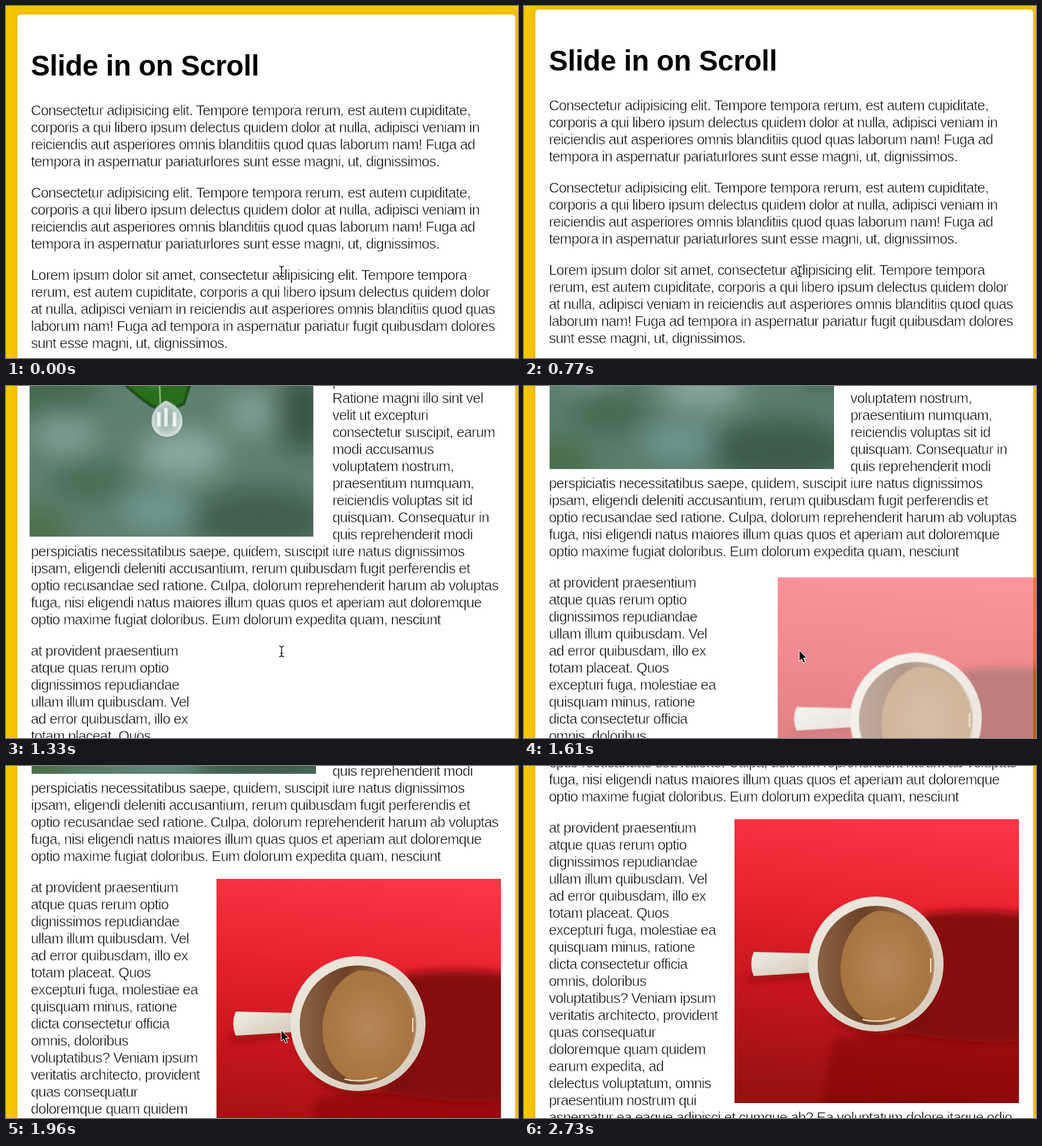
An HTML page that plays this animation: 720x496 px, repeating every 2.8 s.

```html
<!DOCTYPE html>
<html lang="en">
<head>
<meta charset="utf-8">
<title>Slide in on Scroll</title>
<style>
  html, body { margin: 0; width: 100%; height: 100%; overflow: hidden; background: #f8c600; }
  #stage { position: relative; width: 720px; height: 496px; overflow: hidden; }
  #page { position: absolute; inset: 0; will-change: transform;
    font: 20px/24px "Liberation Sans", Arial, sans-serif; letter-spacing: -.55px; color: #000; }
  #card { position: absolute; left: 16px; top: 12px; width: 700px; height: 1700px;
    border-radius: 5px; background: #fff; box-shadow: 0 0 10px 5px rgba(0,0,0,.05); }
  h1, pre { position: absolute; margin: 0; left: 35px; white-space: pre; }
  h1 { top: 64px; font-size: 40px; line-height: 40px; letter-spacing: -.2px; }
  pre { font: inherit; -webkit-text-stroke: .5px #fff; }
  .photo { position: absolute; width: 400px; height: 400px; }
  #cursors { position: absolute; left: 0; top: 0; }
</style>
</head>
<body>
<div id="stage">
  <div id="page">
    <div id="card"></div>
    <h1>Slide in on Scroll</h1>
<pre style="top:135px">Consectetur adipisicing elit. Tempore tempora rerum, est autem cupiditate,
corporis a qui libero ipsum delectus quidem dolor at nulla, adipisci veniam in
reiciendis aut asperiores omnis blanditiis quod quas laborum nam! Fuga ad
tempora in aspernatur pariaturlores sunt esse magni, ut, dignissimos.</pre>
<pre style="top:251px">Consectetur adipisicing elit. Tempore tempora rerum, est autem cupiditate,
corporis a qui libero ipsum delectus quidem dolor at nulla, adipisci veniam in
reiciendis aut asperiores omnis blanditiis quod quas laborum nam! Fuga ad
tempora in aspernatur pariaturlores sunt esse magni, ut, dignissimos.</pre>
<pre style="top:367px">Lorem ipsum dolor sit amet, consectetur adipisicing elit. Tempore tempora
rerum, est autem cupiditate, corporis a qui libero ipsum delectus quidem dolor
at nulla, adipisci veniam in reiciendis aut asperiores omnis blanditiis quod quas
laborum nam! Fuga ad tempora in aspernatur pariatur fugit quibusdam dolores
sunt esse magni, ut, dignissimos.</pre>
<pre style="top:507px;left:459px">Lorem ipsum dolor sit amet,
consectetur adipisicing elit.
Voluptates, deserunt facilis
et iste corrupti omnis tenetur
est. Iste ut est dicta dolor
itaque adipisci, dolorum
minima, veritatis earum
provident error molestias.
Ratione magni illo sint vel
velit ut excepturi
consectetur suscipit, earum
modi accusamus
voluptatem nostrum,
praesentium numquam,
reiciendis voluptas sit id
quisquam. Consequatur in
quis reprehenderit modi</pre>
<pre style="top:915px">perspiciatis necessitatibus saepe, quidem, suscipit iure natus dignissimos
ipsam, eligendi deleniti accusantium, rerum quibusdam fugit perferendis et
optio recusandae sed ratione. Culpa, dolorum reprehenderit harum ab voluptas
fuga, nisi eligendi natus maiores illum quas quos et aperiam aut doloremque
optio maxime fugiat doloribus. Eum dolorum expedita quam, nesciunt</pre>
<pre style="top:1055px">at provident praesentium
atque quas rerum optio
dignissimos repudiandae
ullam illum quibusdam. Vel
ad error quibusdam, illo ex
totam placeat. Quos
excepturi fuga, molestiae ea
quisquam minus, ratione
dicta consectetur officia
omnis, doloribus
voluptatibus? Veniam ipsum
veritatis architecto, provident
quas consequatur
doloremque quam quidem
earum expedita, ad
delectus voluptatum, omnis
praesentium nostrum qui
aspernatur ea eaque adipisci et cumque ab? Ea voluptatum dolore itaque odio</pre>

    <svg id="leaf" class="photo" style="left:36px;top:507px" viewBox="0 0 400 400">
      <defs>
        <filter id="soft" x="-50%" y="-50%" width="200%" height="200%"><feGaussianBlur stdDeviation="18"/></filter>
        <filter id="hazy" x="-50%" y="-50%" width="200%" height="200%"><feGaussianBlur stdDeviation="6"/></filter>
        <linearGradient id="blade" x1="0" y1="0" x2=".5" y2="1">
          <stop offset="0" stop-color="#4d7d55"/><stop offset=".6" stop-color="#32702a"/><stop offset="1" stop-color="#226a14"/>
        </linearGradient>
        <radialGradient id="drop">
          <stop offset="0" stop-color="#8fa8a0"/><stop offset=".7" stop-color="#b4c8c4"/><stop offset="1" stop-color="#dbe6e4"/>
        </radialGradient>
      </defs>
      <rect width="400" height="400" fill="#5a7d6c"/>
      <g filter="url(#soft)">
        <ellipse cx="330" cy="60" rx="100" ry="80" fill="#74958a"/>
        <ellipse cx="30" cy="195" rx="70" ry="35" fill="#3d6648"/>
        <ellipse cx="50" cy="255" rx="45" ry="30" fill="#7a9a90"/>
        <ellipse cx="85" cy="320" rx="55" ry="28" fill="#426a50"/>
        <ellipse cx="215" cy="282" rx="60" ry="35" fill="#86a69d"/>
        <ellipse cx="315" cy="225" rx="40" ry="32" fill="#7c9c92"/>
        <ellipse cx="385" cy="225" rx="42" ry="55" fill="#35523f"/>
        <ellipse cx="325" cy="375" rx="100" ry="45" fill="#3c5c48"/>
        <ellipse cx="180" cy="362" rx="50" ry="28" fill="#6c9692"/>
        <ellipse cx="10" cy="390" rx="50" ry="35" fill="#4a6e48"/>
      </g>
      <path d="M160 0H315C308 28 300 45 280 55Q255 72 229 68Z" fill="#3f7a40"/>
      <path d="M0 0H190C205 30 222 50 231 72C249 104 245 140 236 160Q225 184 217 212L193 222L172 215C150 200 122 178 96 138C73 101 54 65 0 8Z" fill="url(#blade)"/>
      <g filter="url(#hazy)" fill="#c3d4cf">
        <path d="M30 12L92 5L147 40L110 62L55 46Z" opacity=".75"/>
        <path d="M187 20L212 63L205 88L180 58Z" opacity=".6"/>
        <path d="M150 145L185 168L177 190L160 175Z" opacity=".4"/>
        <path d="M225 8L300 0L280 38L240 52Z" opacity=".6"/>
      </g>
      <g fill="none" stroke="#9dc18c" stroke-width="2">
        <path d="M166 0Q180 80 184 212"/>
        <path d="M175 65L90 30M178 105L70 72M180 145L100 125M180 110L226 68M181 155L233 110" stroke-width="1" opacity=".7"/>
        <path d="M198 74Q225 77 265 58" stroke="#d2e5c9"/>
      </g>
      <path d="M96 138C122 178 150 200 172 215L193 222L217 212Q225 184 236 160" fill="none" stroke="#174a10" stroke-width="4"/>
      <path d="M192 207C208 214 216 224 216 237A22 22 0 0 1 171 237C171 224 178 214 192 207Z" fill="url(#drop)" stroke="#3f5f50"/>
      <path d="M182 224v20M192 218v26M204 224v20" stroke="#fff" stroke-width="5" opacity=".85"/>
    </svg>

    <svg id="cup" class="photo" style="left:296px;top:1055px" viewBox="0 0 400 400">
      <defs>
        <linearGradient id="table" x1=".55" y1="0" x2=".45" y2="1">
          <stop offset="0" stop-color="#fa3544"/><stop offset=".3" stop-color="#e9232f"/>
          <stop offset=".6" stop-color="#c9161d"/><stop offset="1" stop-color="#96110f"/>
        </linearGradient>
        <linearGradient id="china" x1="0" y1="0" x2="1" y2="1">
          <stop offset="0" stop-color="#f1ece2"/><stop offset="1" stop-color="#d4c8ba"/>
        </linearGradient>
        <linearGradient id="wall">
          <stop offset="0" stop-color="#8a6244"/><stop offset=".4" stop-color="#6d4128"/><stop offset="1" stop-color="#b58a61"/>
        </linearGradient>
        <radialGradient id="coffee">
          <stop offset="0" stop-color="#b78658"/><stop offset="1" stop-color="#a8743f"/>
        </radialGradient>
      </defs>
      <rect width="400" height="400" fill="url(#table)"/>
      <g filter="url(#hazy)">
        <path d="M265 134Q340 124 410 134V312Q320 318 235 300Z" fill="#86100f"/>
        <path d="M140 310L270 295L410 310V410H120Z" fill="#7a0e0c" opacity=".45"/>
        <path d="M20 224L115 217L150 285Q190 310 255 294L280 270" fill="none" stroke="#6d0c0a" stroke-width="9" opacity=".6"/>
      </g>
      <path d="M27 187L108 189V216L27 221Q20 204 27 187Z" fill="url(#china)"/>
      <circle cx="199" cy="204" r="95" fill="url(#china)"/>
      <ellipse cx="199" cy="206" rx="82" ry="84" fill="url(#wall)"/>
      <path d="M200 129C250 128 279 166 278 210C276 256 247 284 206 286C174 287 149 253 149 212C149 175 169 139 200 129Z" fill="url(#coffee)"/>
      <path d="M180 282Q200 288 226 280M276 196v20" fill="none" stroke="#ead9bd" stroke-width="2"/>
    </svg>
  </div>

  <svg id="cursors" width="720" height="496">
    <g id="beam" fill="none">
      <path id="bar" d="M384 366.5q3 0 3.500 2q.5-2 3.500-2M387.500 368v12M384 381.500q3 0 3.500-2q.5 2 3.500 2M385.500 376.500h4" stroke="#fff" stroke-width="3"/>
      <path d="M384 366.500q3 0 3.500 2q.5-2 3.500-2M387.500 368v12M384 381.500q3 0 3.500-2q.5 2 3.500 2M385.500 376.500h4" stroke="#111" stroke-width="1.200"/>
    </g>
    <path id="arrow" d="M387 372V388L390.500 384.700L393 390.300L395.600 389.200L393.200 383.700H397.800Z" fill="#000" stroke="#fff"/>
  </svg>
</div>
<script>
const $ = id => document.getElementById(id);
const LOOP = 2800, STEP = 70, SLIDE = 500;

// [time, scroll offset]: two flicks, each slowing down
const scrollKeys = [[0, 0], [700, 0], [770, 7], [840, 52], [910, 150], [980, 318], [1050, 478],
  [1120, 552], [1330, 694], [1470, 765], [1680, 802], [1820, 823], [1960, 896],
  [2100, 957], [2170, 971], [2310, 979], [2380, 980], [LOOP, 980]];

function scrollAt(t) {
  const i = scrollKeys.findIndex(k => k[0] > t);
  const [t0, a] = scrollKeys[i - 1], [t1, b] = scrollKeys[i];
  return Math.round(a + (b - a) * (t - t0) / (t1 - t0));
}

// The CSS "ease" curve
function ease(x) {
  if (x <= 0) return 0;
  if (x >= 1) return 1;
  const bezier = (s, p, q) => 3 * s * (1 - s) ** 2 * p + 3 * s * s * (1 - s) * q + s ** 3;
  let lo = 0, hi = 1;
  for (let i = 0; i < 20; i++) {
    const mid = (lo + hi) / 2;
    if (bezier(mid, .25, .25) < x) lo = mid; else hi = mid;
  }
  return bezier(lo, .1, 1);
}

function slideIn(id, t, start, side) {
  const p = ease((t - start) / SLIDE), style = $(id).style;
  style.opacity = p;
  style.transform = `translateX(${side * 120 * (1 - p)}px) scale(${.95 + .05 * p})`;
}

function draw() {
  const t = Math.floor(performance.now() % LOOP / STEP) * STEP;
  $('page').style.transform = `translateY(${-scrollAt(t)}px)`;
  slideIn('leaf', t, 933, -1);
  slideIn('cup', t, 1455, 1);
  $('beam').style.display = t < 1610 ? '' : 'none';
  $('arrow').style.display = t >= 1610 && t < 2660 ? '' : 'none';
  requestAnimationFrame(draw);
}
draw();
</script>
</body>
</html>
```
